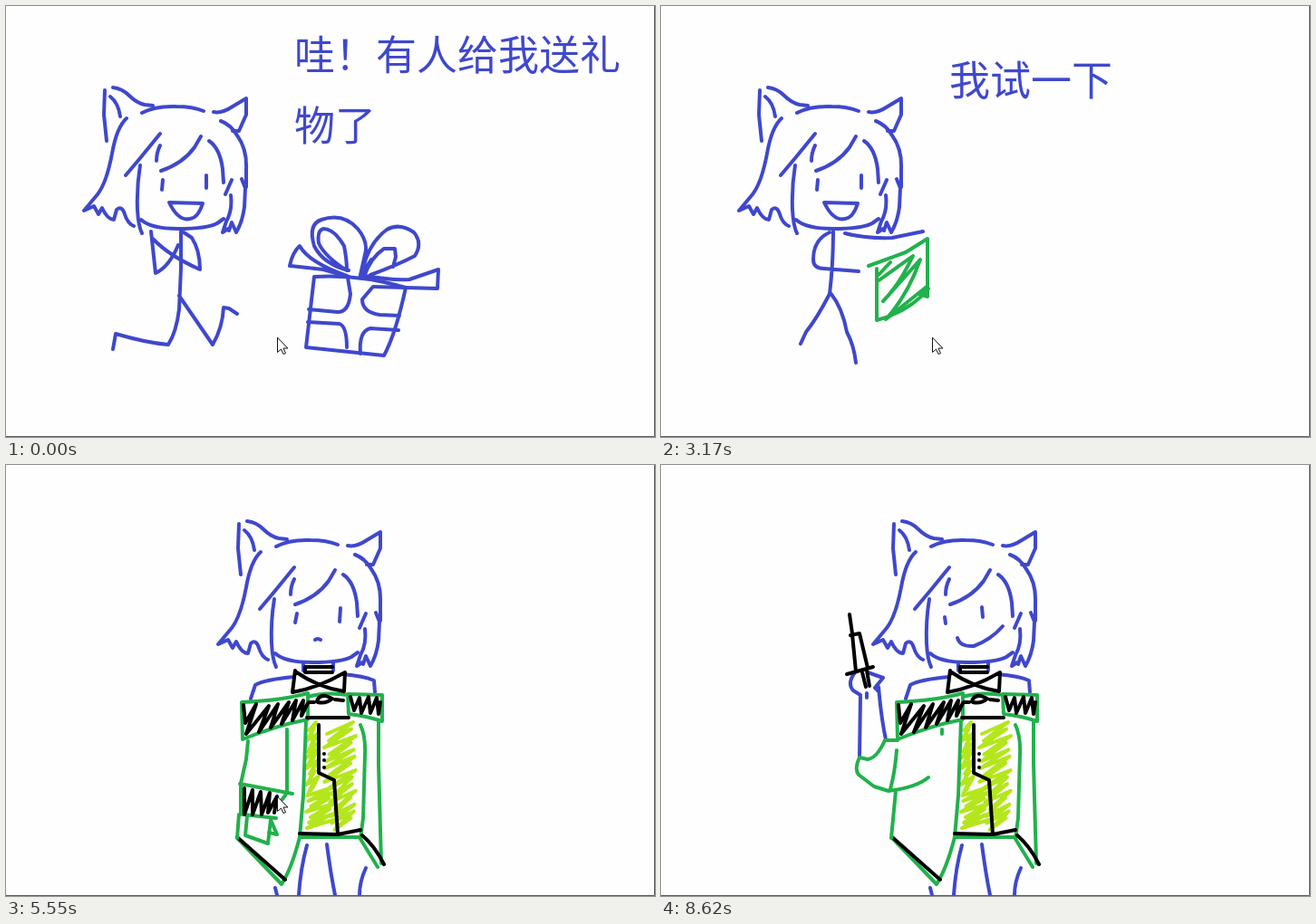
An HTML page that plays this animation: 716 by 476 pixels, repeating every 9740 ms.

```html
<!DOCTYPE html>
<html lang="zh-CN">
<head>
<meta charset="utf-8">
<title>新衣服</title>
<style>
html, body { margin: 0; width: 100%; height: 100%; overflow: hidden; background: #fefefe; }
svg { display: block; width: 716px; height: 476px; }
path { fill: none; stroke-width: 4; stroke-linecap: round; stroke-linejoin: round; }
text { font: 45px "Noto Sans CJK SC", "Noto Sans CJK", sans-serif; }
</style>
</head>
<body>
<svg id="stage" viewBox="0 0 716 476"></svg>
<script>
const BLUE = '#3f48cc', GREEN = '#22b14c', LIME = '#b5e61d', BLACK = '#000';
const LOOP = 9740;

const line = (color, d, width = 4) =>
  `<path stroke="${color}" d="${d}" stroke-width="${width}" style="stroke-width:${width}"/>`;
const words = (color, x, y, s) => `<text x="${x}" y="${y}" fill="${color}">${s}</text>`;
const part = (id, body) => `<g id="${id}" visibility="hidden">${body}</g>`;

// Slanted scribble running down between two sides
function scribble(xl, xr, top, bottom, rows, rise) {
  const pts = [];
  for (let i = 0; i <= rows; i++) {
    const y = top + (bottom - top) * i / rows;
    const wob = 3 * Math.sin(i * 2.4);
    pts.push(`${xl(y) + wob} ${y + rise}`, `${xr(y) - wob} ${y}`);
  }
  return 'M' + pts.join('L');
}

const ears = `M109 93L108 120 111 149M115 100Q124 107 126 122
  M118 90Q128 91 136 99T153 109L162 110M150 118Q165 110 188 111Q206 111 218 116
  M229 117Q238 119 250 111L265 102 265 120 257 138 250 138`;
const hair = `M237 127Q248 131 255 143Q266 158 265 180V200
  M133 124Q122 134 117 163Q111 195 101 208L86 226 97 221 102 230 106 223Q112 236 119 236
  L122 225Q128 220 131 230T141 243
  M132 187L148 168 170 141M170 154Q166 162 166 171M171 182Q195 174 208 156L215 144
  M224 149Q236 157 239 180L240 195`;
const face = `M148 176Q144 200 145 225Q146 243 150 251M149 236Q160 246 190 246Q222 246 233 240L240 235
  M249 192L242 208M248 209Q250 226 243 238L239 250 245 246
  M260 191L264 201 263 222Q261 238 254 250L249 239 246 248`;
const head = line(BLUE, ears) + line(BLUE, hair) + line(BLUE, face);
const grin = line(BLUE, 'M173 192L172 203M221 187V201M180 217L217 218Q212 234 203 235Q190 238 180 217Z');
const shift = s => `<g transform="translate(148 -28)">${s}</g>`;

const kneel = line(BLUE, `M193 249V290L191 335Q188 360 179 374Q155 372 121 362L118 379
  M191 320L228 374Q239 355 240 333L246 334 255 340
  M160 249L165 295Q180 288 190 264M162 257Q180 276 214 291Q214 270 205 256L196 250`);
const gift = line(BLUE, `M340 299L331 377 417 386Q430 362 441 311M340 299Q390 296 441 311
  M377 300L380 318Q378 338 366 338L334 335M404 311L393 324Q393 338 412 341L434 342
  M333 349L368 351Q376 354 376 377M433 358L402 356Q389 359 391 384`)
  + line(BLUE, `M378 292Q350 285 340 265Q333 241 348 236Q372 228 388 246Q398 258 397 270L391 297
  M376 292Q352 277 345 262Q343 248 350 246Q362 246 373 265Q376 280 376 292
  M394 290Q400 262 420 247Q434 239 450 250Q460 262 451 276Q432 286 402 297
  M395 299Q402 278 417 268L429 268 430 277 427 288
  M313 287Q316 272 324 265Q334 283 376 298M314 287L350 291 378 299
  M396 298Q425 303 445 302L477 291 476 312 405 310M390 300L403 280`);

const cloth = line(GREEN, `M335 87L420 97 476 101 540 108 588 117Q588 160 580 210Q575 235 575 250Q564 290 563 320
  M337 87Q330 170 322 215Q311 300 312 338L365 344 435 350 510 358 545 359
  M420 100Q419 180 416 240Q410 290 400 346M538 108Q531 190 522 240Q518 300 514 343`);
const trim = line(BLACK, `M338 91L362 98 413 102 335 99 412 110 336 109 414 116 331 119 415 118 330 130 413 125
  L330 131Q390 133 418 141M540 115L582 121 537 123 575 131 537 140 541 145 582 146 566 147M575 131L556 130`);
const print = line(LIME, `M425 105L419 120Q440 117 474 99Q440 136 430 148L505 118Q450 145 428 163L530 131
  Q450 180 425 195L510 158Q440 212 418 222L500 190Q445 228 422 248L510 207Q440 265 418 288L521 241
  Q440 300 400 314L505 271Q440 308 403 328L508 280Q450 320 410 340L505 290Q460 330 435 349
  L495 327Q484 341 472 349L503 340 500 356`);
const hand = line(BLUE, `M570 329Q590 322 610 323Q637 323 645 339Q659 360 658 396Q650 417 632 424
  M610 422Q575 417 557 390Q549 365 553 345Q560 332 570 329M605 475L604 427 637 425 661 397 685 426 714 473
  M661 407Q650 430 611 450L674 429Q635 448 612 473L688 449Q668 460 652 474L692 464`);

const stand = line(BLUE, `M190 249Q190 285 186 318Q172 345 160 360L154 373M187 317Q200 333 205 360Q213 375 215 394
  M186 250Q168 258 168 280Q168 290 180 290L218 293M203 251Q225 257 255 256L289 249`);
const bundle = line(GREEN, `M229 287L270 272 294 257 294 321 285 318M238 290V347Q275 337 295 312
  M240 297L253 283M239 304L278 276Q262 309 245 326L286 280Q272 320 248 346L293 310`);

const limbs = line(BLUE, `M328 218V227M361 218V227M318 234Q285 237 275 243L270 258M371 231Q395 233 406 238L407 251
  M332 420Q325 445 323 475M354 419Q358 450 363 475M397 445Q390 460 390 475M297 467L299 475`);
const coat = line(GREEN, `M260 262Q305 260 333 252V281Q300 287 261 303ZM377 253L415 254 415 283Q397 277 378 275Z
  M333 256Q352 250 377 254M331 282L328 365 324 411H390M391 287Q397 300 396 320L394 390 391 413 410 444
  M411 283V330L414 440M324 411Q315 446 304 463L255 412`);
const lime = line(LIME, scribble(y => 334, y => y > 350 ? 359 : 342, 284, 392, 18, 9)
  + scribble(y => y > 350 ? 360 : 354, y => 383, 284, 390, 14, 13));
const dark = line(BLACK, `M330 223H360M331 229H360M330 223V229M319 227L316 251Q345 246 374 229L373 250Q345 246 319 228
  M343 261Q345 254 353 255L360 258Q353 264 344 262M334 262H340M363 259L372 260M332 279H378
  M345 287V340L362 348 366 408M324 407L366 408 391 403M255 411L308 458M393 409Q407 421 417 441`)
  + line(BLACK, `M351 319V319M351 326V326M351 334V334`)
  + line(BLACK, `M262 265L264 285 276 264 265 297 290 266 279 295 300 264 292 290 312 262 304 286 320 260 316 282 328 260 326 277 333 263
  M380 256L384 271 390 257 392 274 400 256 402 274 409 257 411 275 413 262`);
const body = limbs + lime + coat + dark;

const sleeve = line(GREEN, `M267 305L265 325 259 352V386M310 292V361M258 352L316 363M310 362L305 369
  M262 386L298 390M266 388L264 409 289 418 292 392 299 408 290 406M257 386L255 412`)
  + line(BLACK, 'M263 357L263 386 272 359 272 386 281 361 282 386 291 362 289 384 299 366 296 384');
const raised = line(BLUE, `M220 256L219 322M240 245Q243 280 248 303M214 229Q205 241 212 249L220 254
  M228 229L245 235 236 246 240 250M227 252V257`)
  + line(GREEN, `M261 304L247 304Q238 324 228 325L219 323Q213 336 218 342L235 355 251 360Q282 356 295 345
  M260 315Q258 340 253 358M259 360L254 412M310 292V297`)
  + line(BLACK, 'M208 165L211 186M209 188L219 186M211 187L215 228M219 186L228 224M205 231L234 223M222 229L226 245M227 227L230 244');

const still = line(BLUE, 'M321 164L319 174M369 158L368 173M341 193Q343 191 347 193');
const smile = line(BLUE, 'M313 168L314 175M354 157L355 168M327 191Q330 201 345 200Q364 193 377 178');

const parts = {
  surprise: head + grin + kneel + gift
    + words(BLUE, 318, 71, '哇！有人给我送礼') + words(BLUE, 318, 149, '物了'),
  present: cloth + print + trim + hand + words(LIME, 75, 62, '一件新衣服'),
  tryOn: head + grin + stand + bundle + words(BLUE, 318, 99, '我试一下'),
  dressed: shift(head) + body,
  happy: shift(grin) + words(BLUE, 391, 65, '感觉不错'),
  sleeve, raised, still, smile,
  cursor: '<path d="M299.5 366.5V382.5L303.5 379 306 384.5 308.5 383.5 306 378H310.5Z" style="fill:#fff;stroke:#111;stroke-width:1;stroke-linejoin:miter"/>'
};

// Start time in ms, then the visible parts
const steps = [
  [0, 'surprise cursor'],
  [1940, 'present cursor'],
  [3050, 'tryOn cursor'],
  [4320, 'dressed sleeve happy cursor'],
  [5400, 'dressed sleeve still cursor'],
  [6520, 'dressed raised still cursor'],
  [7510, 'dressed raised smile cursor'],
  [8470, 'dressed raised smile']
];

const stage = document.getElementById('stage');
stage.innerHTML = '<rect width="716" height="476" fill="#fefefe"/>'
  + Object.entries(parts).map(([id, s]) => part(id, s)).join('')
  + '<path d="M715.5 0V475.5H0" style="stroke:#5a5a5a;stroke-width:1"/>';
const groups = [...stage.querySelectorAll('g[id]')];

let shown;
function draw(time) {
  const t = time % LOOP;
  const step = steps.findLast(s => s[0] <= t) || steps[0];
  if (step !== shown) {
    shown = step;
    const on = step[1].split(' ');
    groups.forEach(g => g.setAttribute('visibility', on.includes(g.id) ? 'visible' : 'hidden'));
  }
}

let start;
function tick(now) {
  start ??= now;
  draw(now - start);
  requestAnimationFrame(tick);
}
draw(0);
requestAnimationFrame(tick);
</script>
</body>
</html>
```
